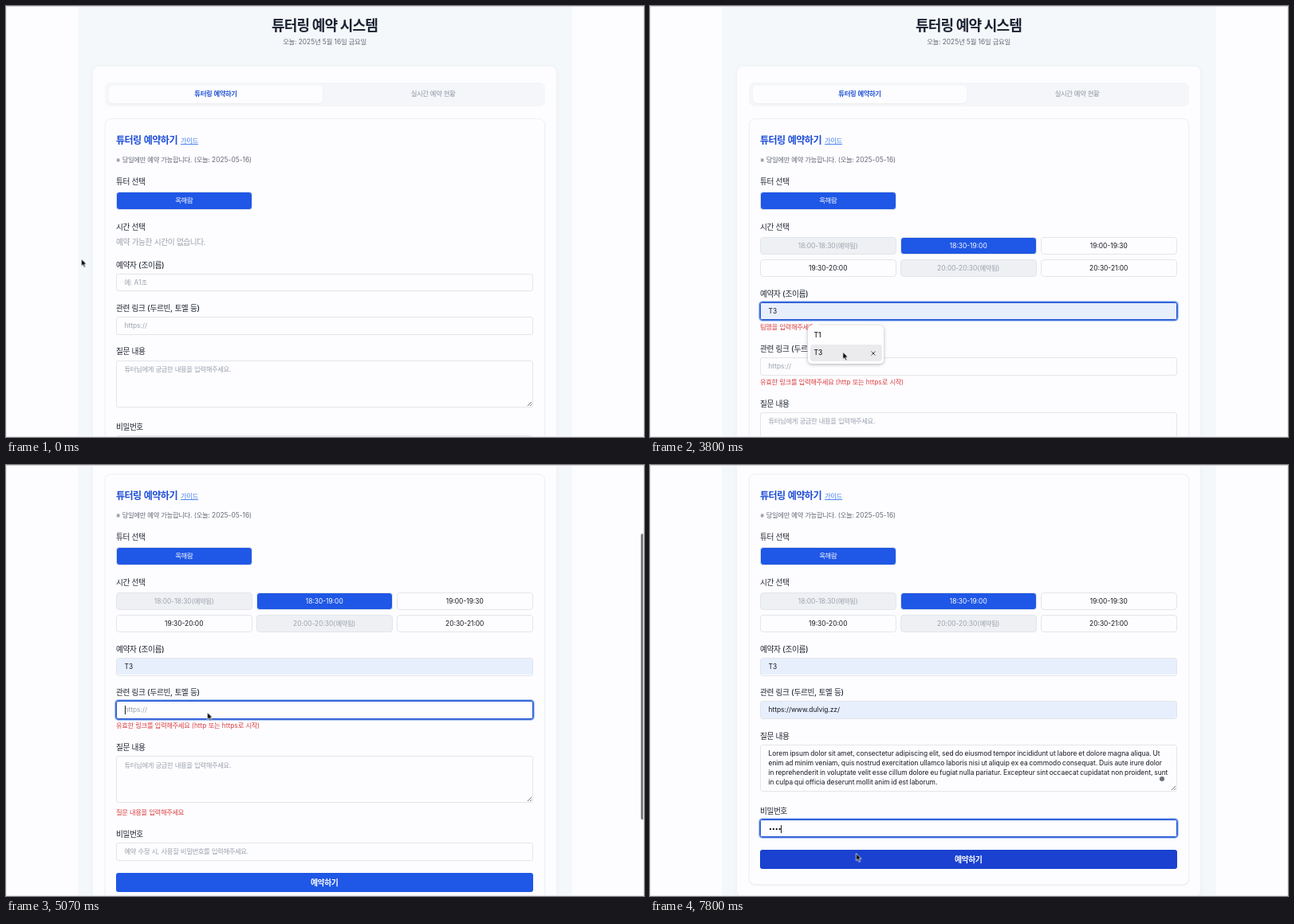
Recreate the animation shown at these times as an HTML page. Size 800 px wide and 541 px high, loop 8 s.

```html
<!DOCTYPE html>
<html lang="ko">
<head>
<meta charset="utf-8">
<title>튜터링 예약</title>
<style>
:root { --blue: #1f57e6; --line: #e2e5ea; --white: #fdfdff; --ink: #1f2430; }
* { box-sizing: border-box; margin: 0; padding: 0; }
html, body { width: 100%; height: 100%; overflow: hidden; background: var(--white); }
body {
  position: relative; color: var(--ink); white-space: nowrap;
  font: 8.4px Inter, "Noto Sans CJK KR", "Noto Sans CJK", sans-serif;
}
i { font-style: normal; letter-spacing: -.047em; }
.stage { position: absolute; left: 0; top: 0; width: 800px; height: 541px; overflow: hidden; }
.stage div, .stage span, .stage p { position: absolute; }
.column { left: 90px; top: 0; width: 619.5px; height: 541px; background: #f5f8fb; }
.page { left: 0; top: 0; width: 800px; height: 815px; animation: scroll 8s linear infinite; }

/* y is the middle of the line */
.stage p { line-height: 20px; margin-top: -10px; }
.mid { left: 0; width: 799px; text-align: center; }
.title { font-size: 18.1px; font-weight: 700; color: #1c2433; word-spacing: -.05em; }
.grey { color: #666b78; }
.label { left: 138px; font-size: 9.7px; font-weight: 500; }
.soft { color: #989eaa; }

.outer {
  inset: -212px 110.5px -15px 109px; border-radius: 8px;
  background: var(--white); box-shadow: 0 1px 6px rgba(30, 40, 70, .06);
}
.inner {
  inset: -147px 124.5px 0 123.5px; border-radius: 8px; border: 1px solid #eff1f5;
  background: var(--white); box-shadow: 0 1px 2px rgba(30, 40, 70, .07);
}
.tabs { left: 124px; top: 95.5px; width: 551.5px; height: 30.5px; border-radius: 7px; background: #f4f6f9; }
.tab { top: 4.5px; width: 268px; height: 21.5px; border-radius: 5px; line-height: 21.5px; text-align: center; color: #8e94a1; font-weight: 500; }
.tab.on { left: 5px; background: var(--white); color: #2456d6; font-weight: 600; box-shadow: 0 1px 2px rgba(0, 0, 0, .04); }
.guide { left: 219px; color: #4a84ee; text-decoration: underline; }

.btn {
  width: 170.5px; height: 22.5px; border-radius: 4px; border: 1px solid var(--line);
  line-height: 20.5px; text-align: center; color: #14171f; background: var(--white);
}
.btn.off { background: #eef0f3; color: #9da3ad; }
.btn.blue { background: var(--blue); color: #fff; }
.c1 { left: 138px; } .c2 { left: 314px; } .c3 { left: 490px; }
.r1 { top: 1.8px; } .r2 { top: 29.6px; }

/* the form flows, so errors push what follows */
.flow { top: 288px; left: 0; width: 800px; padding-bottom: 59px; }
.stage .times, .stage .row, .stage .err { position: relative; }
.times { height: 16px; overflow: hidden; animation: grow 8s step-end infinite; }
.row { height: 54.4px; }
.row.tall { height: 94.3px; }
.row .label { top: 21.7px; }
.field {
  left: 138px; top: 31.8px; width: 522.5px; height: 22.6px; border-radius: 3px;
  border: 1px solid var(--line); background: var(--white);
}
.tall .field { height: 59px; }
.field > span { inset: 0; padding-left: 9.5px; line-height: 20.6px; border-radius: 2px; }
.tall .field > span { line-height: 12px; padding-top: 4.4px; }
.hint { color: #9aa1ad; }
.value { background: var(--white); color: #14171f; white-space: pre; word-spacing: -.05em; }
.fill { background: #e7effd; }
.field > .ring {
  inset: -1px; border: 1px solid #2457d4; border-radius: 3px; animation: 8s linear infinite;
  box-shadow: 0 0 0 .7px #2457d4, 0 0 0 2px #b0c9f7;
}
.ring::after { content: ""; position: absolute; left: 9.5px; top: 5px; width: 1px; height: 11px; background: #222; }
.stage .caret { position: static; display: inline-block; width: 1px; height: 11px; vertical-align: -2.5px; background: #222; }
.grip { right: 1px; bottom: 1px; width: 5px; height: 5px; background: linear-gradient(135deg, #0000 48%, #777 48% 58%, #0000 58% 76%, #777 76% 86%, #0000 86%); }
.badge { left: 499.5px; top: 39.5px; width: 6.4px; height: 6.4px; border-radius: 50%; background: #6c717b; }
.field > .pw { animation: typed 8s step-end infinite; }
.stage .dots {
  position: static; display: inline-block; height: 10px; vertical-align: -2.5px; border-right: 1px solid #222;
  background: radial-gradient(circle at 2px 5px, #111 .9px, #0000 1.3px) 0 0 / 3.9px 10px repeat-x;
  animation: dots 8s step-end infinite;
}
.err { height: 0; overflow: hidden; animation: 8s step-end infinite; }
.err span { left: 138px; top: 0; line-height: 17.4px; color: #dc3f40; }
.send {
  left: 138px; top: 69.4px; width: 522.5px; height: 24px; border-radius: 3px; line-height: 24px; text-align: center;
  font-size: 9.9px; font-weight: 600; color: #fff; background: var(--blue); animation: press 8s linear infinite;
}
.t { animation: 8s step-end infinite; }

.popup {
  left: 198px; top: 401px; width: 95px; height: 48px; border-radius: 5px; background: #fefeff;
  box-shadow: 0 1px 4px rgba(0, 0, 0, .3); font-weight: 500; color: #1b1d22;
}
.popup::before { content: ""; position: absolute; left: 6px; top: -3px; width: 7px; height: 7px; background: #fefeff; transform: rotate(45deg); }
.item { left: 2.5px; width: 90px; height: 21.5px; line-height: 21.5px; }
.item span { left: 5px; top: 0; }
.hover { inset: 0; border-radius: 4px; background: #ebebee; }
.hover svg { position: absolute; left: 76px; top: 8px; }

.bar { left: 796px; top: 0; width: 4px; height: 359px; border-radius: 2px; background: #7e7e82; animation: slide 8s linear infinite, bar 8s linear infinite; }
.edge { inset: 0; border: 1px solid #e9e9ee; border-top-color: #d2d2d7; }
.cursor { left: 0; top: 0; animation: move 8s ease-in-out infinite; }
.cursor svg { position: absolute; left: 0; top: 0; overflow: visible; animation: 8s step-end infinite; }

@keyframes move {
  0%, .9% { transform: translate(94.5px, 317.5px); }
  9.1%, 16.6% { transform: translate(195px, 245px); }
  21.6%, 26.6% { transform: translate(360px, 305.5px); }
  30.8%, 35.9% { transform: translate(263px, 371px); }
  37.5%, 42.5% { transform: translate(263px, 384px); }
  45.9%, 58.4% { transform: translate(241.8px, 434.3px); }
  61.6%, 65% { transform: translate(252.5px, 310.5px); }
  69.1%, 80.9% { transform: translate(254.7px, 355.5px); }
  86.6%, 95% { transform: translate(257px, 457px); }
  96.6%, 100% { transform: translate(258.5px, 487.5px); }
}
@keyframes arrow { 0% { opacity: 1; } 36.6% { opacity: 0; } 42.9% { opacity: 1; } 49.125% { opacity: 0; } 58.4% { opacity: 1; } 70.875% { opacity: 0; } 95.3% { opacity: 1; } }
@keyframes beam { 0% { opacity: 0; } 36.6% { opacity: 1; } 42.9% { opacity: 0; } 49.125% { opacity: 1; } 58.4% { opacity: 0; } 70.875% { opacity: 1; } 95.3% { opacity: 0; } }
@keyframes scroll {
  0%, 50.9% { transform: translateY(0); }
  52.5% { transform: translateY(-22px); }
  55% { transform: translateY(-87px); }
  56.6% { transform: translateY(-120px); }
  58.4%, 100% { transform: translateY(-130px); }
}
@keyframes slide {
  0%, 50.9% { transform: translateY(0); }
  52.5% { transform: translateY(14.6px); }
  55% { transform: translateY(57px); }
  56.6% { transform: translateY(79.6px); }
  58.4%, 100% { transform: translateY(86.2px); }
}
@keyframes bar { 0%, 50.9% { opacity: 0; } 51.5%, 64.1% { opacity: 1; } 66.5%, 100% { opacity: 0; } }
@keyframes grow { 0% { height: 16px; } 11.625% { height: 52.3px; } }
@keyframes empty { 0% { opacity: 1; } 11.625% { opacity: 0; } }
@keyframes loaded { 0% { opacity: 0; } 11.625% { opacity: 1; } }
@keyframes pick {
  0%, 25% { background: var(--white); color: #14171f; }
  26.6%, 100% { background: var(--blue); color: #fff; }
}
@keyframes err-name { 0% { height: 0; } 11.625% { height: 14.5px; } 49.125% { height: 0; } }
@keyframes err-link { 0% { height: 0; } 11.625% { height: 14.5px; } 70.875% { height: 0; } }
@keyframes err-ask { 0% { height: 0; } 11.625% { height: 14.5px; } 80% { height: 0; } }
@keyframes ring-name { 0%, 37.5% { opacity: 0; } 39.2%, 61.2% { opacity: 1; } 62.6%, 100% { opacity: 0; } }
@keyframes ring-link { 0%, 61.2% { opacity: 0; } 62.6%, 75% { opacity: 1; } 76.5%, 100% { opacity: 0; } }
@keyframes ring-ask { 0%, 75% { opacity: 0; } 76.5%, 86.8% { opacity: 1; } 88.3%, 100% { opacity: 0; } }
@keyframes ring-pw { 0%, 86.8% { opacity: 0; } 88.3%, 100% { opacity: 1; } }
@keyframes popup { 0% { opacity: 0; } 39.125% { opacity: 1; } 49.125% { opacity: 0; } }
@keyframes name { 0% { opacity: 0; } 44.125% { opacity: 1; } }
@keyframes link { 0% { opacity: 0; } 69.125% { opacity: 1; } }
@keyframes link-caret { 0% { opacity: 1; } 75% { opacity: 0; } }
@keyframes ask { 0% { opacity: 0; } 80% { opacity: 1; } }
@keyframes badge { 0% { opacity: 0; } 92.5% { opacity: 1; } }
@keyframes typed { 0% { opacity: 0; } 91.625% { opacity: 1; } }
@keyframes dots { 0% { width: 4.9px; } 92.5% { width: 8.8px; } 93.375% { width: 12.7px; } 94.125% { width: 16.6px; } }
@keyframes press { 0%, 96.2% { background: var(--blue); } 97.4%, 100% { background: #1a41d0; } }
</style>
</head>
<body>
<div class="stage">
  <div class="column"></div>
  <div class="page">
    <div class="flow">
      <div class="outer"></div>
      <div class="inner"></div>
      <div class="times">
        <p class="soft t" style="left:138px;top:9px;font-size:9.7px;animation-name:empty">예약 가능한 시간이 없습니다.</p>
        <div class="t" style="left:0;top:0;animation-name:loaded">
          <div class="btn off c1 r1">18:00-18:30(예약됨)</div>
          <div class="btn c2 r1" style="animation:pick 8s linear infinite">18:30-19:00</div>
          <div class="btn c3 r1">19:00-19:30</div>
          <div class="btn c1 r2">19:30-20:00</div>
          <div class="btn off c2 r2">20:00-20:30(예약됨)</div>
          <div class="btn c3 r2">20:30-21:00</div>
        </div>
      </div>

      <div class="row">
        <p class="label">예약자 (조이름)</p>
        <div class="field">
          <span class="hint">예: A1조</span>
          <span class="ring" style="animation-name:ring-name"></span>
          <span class="value fill t" style="animation-name:name">T3</span>
        </div>
      </div>
      <div class="err" style="animation-name:err-name"><span>팀명을 입력해주세요</span></div>

      <div class="row">
        <p class="label">관련 링크 (두르빈, 토멜 등)</p>
        <div class="field">
          <span class="hint">https://</span>
          <span class="ring" style="animation-name:ring-link"></span>
          <span class="value fill t" style="animation-name:link">https://www.dulvig.zz/<span class="caret t" style="animation-name:link-caret"></span></span>
        </div>
      </div>
      <div class="err" style="animation-name:err-link"><span>유효한 링크를 입력해주세요 (http 또는 https로 시작)</span></div>

      <div class="row tall">
        <p class="label">질문 내용</p>
        <div class="field">
          <span class="hint">튜터님에게 궁금한 내용을 입력해주세요.</span>
          <span class="ring" style="animation-name:ring-ask"></span>
          <span class="value t" style="animation-name:ask">Lorem ipsum dolor sit amet, consectetur adipiscing elit, sed do eiusmod tempor incididunt ut labore et dolore magna aliqua. Ut
enim ad minim veniam, quis nostrud exercitation ullamco laboris nisi ut aliquip ex ea commodo consequat. Duis aute irure dolor
in reprehenderit in voluptate velit esse cillum dolore eu fugiat nulla pariatur. Excepteur sint occaecat cupidatat non proident, sunt
in culpa qui officia deserunt mollit anim id est laborum.</span>
          <div class="grip"></div>
          <div class="badge t" style="animation-name:badge"></div>
        </div>
      </div>
      <div class="err" style="animation-name:err-ask"><span>질문 내용을 입력해주세요</span></div>

      <div class="row">
        <p class="label">비밀번호</p>
        <div class="field">
          <span class="hint">예약 수정 시, 사용할 비밀번호를 입력해주세요.</span>
          <span class="ring" style="animation-name:ring-pw"></span>
          <span class="value pw"><span class="dots"></span></span>
        </div>
        <div class="send">예약하기</div>
      </div>
    </div>

    <p class="mid title" style="top:23.5px">튜터링 예약 시스템</p>
    <p class="mid grey" style="top:45.3px">오늘: 2025년 5월 16일 금요일</p>
    <div class="tabs">
      <div class="tab on">튜터링 예약하기</div>
      <div class="tab" style="left:277.5px">실시간 예약 현황</div>
    </div>
    <p style="left:138px;top:168.5px;font-size:12.1px;font-weight:600;color:#1f4fd6">튜터링 예약하기</p>
    <p class="guide" style="top:168.8px">가이드</p>
    <p class="grey" style="left:138px;top:193px">※ 당일에만 예약 가능합니다. (오늘: 2025-05-16)</p>
    <p class="label" style="top:220.5px">튜터 선택</p>
    <div class="btn blue c1" style="top:233px;font-weight:500">옥해람</div>
    <p class="label" style="top:277.5px">시간 선택</p>

    <div class="popup t" style="animation-name:popup">
      <div class="item" style="top:2px"><span>T1</span></div>
      <div class="item" style="top:23.5px">
        <div class="hover t" style="animation-name:name"><svg width="6" height="6"><path d="M.5 .5l5 5m0-5l-5 5" stroke="#333" stroke-width=".9"/></svg></div>
        <span>T3</span>
      </div>
    </div>
  </div>

  <div class="bar"></div>
  <div class="edge"></div>
  <div class="cursor">
    <svg width="8" height="12" style="animation-name:arrow"><path d="M0 0V9.2L2.1 7.3L3.6 10.8L5.2 10.1L3.7 6.7H6.5Z" fill="#000" stroke="#fff" stroke-width=".8"/></svg>
    <svg width="6" height="11" style="animation-name:beam"><path d="M-2.6 -5.2Q-.4 -5.2 0 -4.2Q.4 -5.2 2.6 -5.2M0 -4.2V4.2M-2.6 5.2Q-.4 5.2 0 4.2Q.4 5.2 2.6 5.2M-1.2 1.6H1.2" fill="none" stroke="#111" stroke-width="1"/></svg>
  </div>
</div>
<script>
// tighter tracking for Hangul only
for (const el of document.querySelectorAll('.stage p, .stage div, .stage span')) {
  if (!el.children.length) el.innerHTML = el.innerHTML.replace(/[가-힣]+/g, '<i>$&</i>');
}
</script>
</body>
</html>
```
